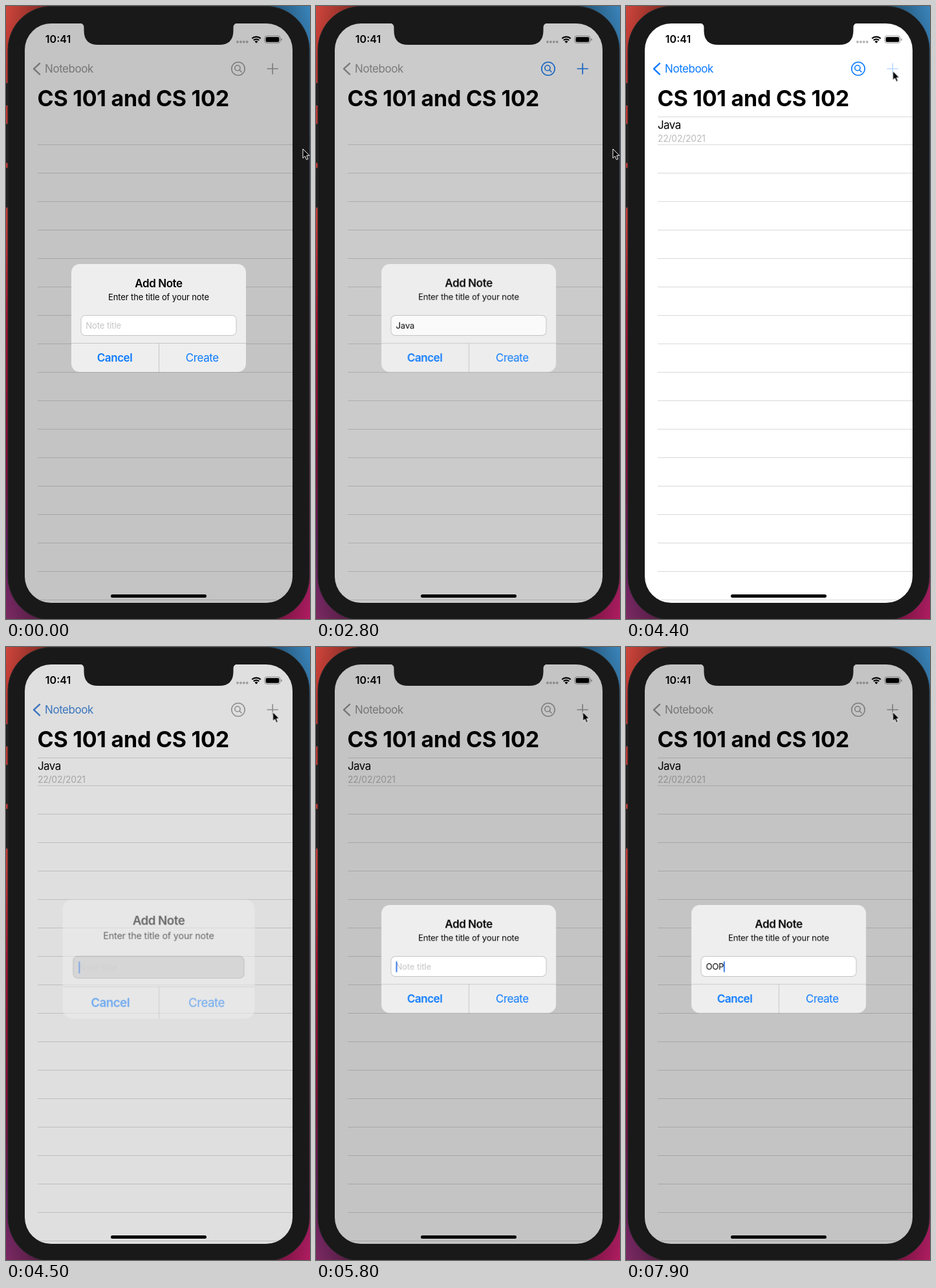
Recreate the animation shown at these times as an HTML page. Size 470x948 px, loop 8 s.

```html
<!DOCTYPE html>
<html lang="en">
<head>
<meta charset="utf-8">
<title>Add Note</title>
<style>
  html, body { margin: 0; width: 100%; height: 100%; overflow: hidden; background: #191919; }
  svg { display: block; width: 470px; height: 948px; }
  text { font-family: Inter, "Liberation Sans", sans-serif; font-size: 17px; letter-spacing: -.43px; white-space: pre; }
  .mid { text-anchor: middle; }
  .semi { font-weight: 600; }
  .small { font-size: 13px; letter-spacing: -.13px; }
  .title { font-size: 34px; font-weight: 700; letter-spacing: -.25px; }
  .time { font-size: 16px; font-weight: 600; letter-spacing: 0; }
  .date { font-size: 14px; letter-spacing: -.25px; fill: #bbb; }
  .link { fill: #0a7aff; }
  .line { fill: none; stroke: currentColor; stroke-linecap: round; stroke-linejoin: round; }

  /* One shared 8 s loop, held in 100 ms steps */
  .dim, .alert, .field, .back, .icons, .plus, .row, .pointer { animation: 8s step-end infinite; }
  .dim { animation-name: dim; }
  .alert { animation-name: alert; transform-origin: 236px 482.5px; }
  .field { animation-name: field; }
  .back { animation-name: back; }
  .icons { animation-name: icons; }
  .plus { animation-name: press; }
  .row { animation-name: row; }
  .pointer { animation-name: point; }

  @keyframes dim {
    0% { opacity: .23; }
    35% { opacity: .205; }
    36.25% { opacity: .07; }
    37.5% { opacity: .015; }
    38.75% { opacity: 0; }
    56.25% { opacity: .125; }
    57.5% { opacity: .21; }
    58.75%, 100% { opacity: .23; }
  }
  @keyframes alert {
    0% { opacity: 1; transform: none; }
    35% { opacity: .97; }
    36.25% { opacity: .3; }
    37.5% { opacity: .06; }
    38.75% { opacity: 0; }
    56.25% { opacity: .54; transform: scale(1.1); }
    57.5% { opacity: .92; transform: scale(1.015); }
    58.75%, 100% { opacity: 1; transform: none; }
  }
  @keyframes field {
    0% { fill: #fff; stroke: #c4c4c6; }
    35% { fill: #fbfbfb; stroke: #c4c4c6; }
    36.25% { fill: #cfcfcf; stroke: #cfcfcf; }
    56.25% { fill: #cfcfcf; stroke: #a8a8a8; }
    57.5% { fill: #f6f6f6; stroke: #c0c0c2; }
    58.75%, 100% { fill: #fff; stroke: #c4c4c6; }
  }
  @keyframes back {
    0% { color: #999; }
    36.25% { color: #1a7df2; }
    37.5% { color: #0a7aff; }
    56.25% { color: #4285d8; }
    57.5% { color: #8794a3; }
    58.75%, 100% { color: #999; }
  }
  @keyframes icons {
    0% { color: #a3a3a3; }
    35% { color: #1a7cf2; }
    37.5% { color: #0a7aff; }
    56.25%, 100% { color: #a3a3a3; }
  }
  @keyframes press {
    0% { opacity: 1; }
    53.75% { opacity: .28; }
    56.25%, 100% { opacity: 1; }
  }
  @keyframes row {
    0% { visibility: hidden; }
    38.75%, 100% { visibility: visible; }
  }
  @keyframes point {
    0% { transform: translate(459px, 221px); }
    43.75% { transform: translate(459px, 221px); animation-timing-function: steps(7); }
    52.5%, 100% { transform: translate(412.5px, 100.5px); }
  }
</style>
</head>
<body>
<svg viewBox="0 0 470 948">
  <defs>
    <linearGradient id="warm" x2="0" y2="1">
      <stop offset="0" stop-color="#cf463c"/>
      <stop offset=".1" stop-color="#b8352f"/>
      <stop offset=".35" stop-color="#c23b37"/>
      <stop offset=".52" stop-color="#a2102c"/>
      <stop offset=".75" stop-color="#7c0c36"/>
      <stop offset=".88" stop-color="#5f1d5c"/>
      <stop offset="1" stop-color="#7c2a63"/>
    </linearGradient>
    <linearGradient id="cool" x2="0" y2="1">
      <stop offset="0" stop-color="#3a85bb"/>
      <stop offset=".1" stop-color="#2d6a99"/>
      <stop offset=".9" stop-color="#8f1c58"/>
      <stop offset="1" stop-color="#b01c60"/>
    </linearGradient>
    <linearGradient id="shade">
      <stop offset="0" stop-opacity="0"/>
      <stop offset=".15" stop-opacity=".45"/>
      <stop offset=".85" stop-opacity=".45"/>
      <stop offset="1" stop-opacity="0"/>
    </linearGradient>
    <clipPath id="screen"><rect x="29" y="27" width="414" height="896" rx="41"/></clipPath>
  </defs>

  <!-- Desktop and phone body -->
  <rect width="235" height="948" fill="url(#warm)"/>
  <rect x="235" width="235" height="948" fill="url(#cool)"/>
  <rect width="470" height="948" fill="url(#shade)"/>
  <g fill="#1e1e1e" stroke="#363636">
    <rect x="-3" y="119.500" width="8" height="34" rx="1"/>
    <rect x="-3" y="182.500" width="8" height="60" rx="1"/>
    <rect x="-3" y="250.500" width="8" height="61" rx="1"/>
  </g>
  <rect x="3" y=".5" width="466" height="949" rx="67" fill="#191919" stroke="#2a2a2a"/>

  <g clip-path="url(#screen)">
    <rect x="29" y="27" width="414" height="896" fill="#fff"/>

    <!-- Status bar -->
    <text class="time mid" x="80.500" y="57.300">10:41</text>
    <path d="M358 55.500h16" stroke="#b4b4b4" stroke-width="3.800" stroke-linecap="round" stroke-dasharray="0 4.900"/>
    <g fill="none" stroke="#000" stroke-width="2.200">
      <path d="M380.300 50.300a9.500 9.500 0 0 1 13.400 0"/>
      <path d="M382.800 53a6 6 0 0 1 8.400 0"/>
    </g>
    <path d="M387 57.500l-2.500-2.600a3.600 3.600 0 0 1 5 0z"/>
    <rect x="399.900" y="46.300" width="24" height="11" rx="3.400" fill="none" stroke="#000" stroke-opacity=".4"/>
    <rect x="401.500" y="47.900" width="20.800" height="7.800" rx="2"/>
    <path d="M425.400 50v3.800q1.500-.5 1.500-1.900t-1.500-1.900z" fill-opacity=".45"/>

    <!-- Navigation -->
    <g class="back">
      <path class="line" stroke-width="2.400" d="M52 88.800L43 97.200L52 105.600"/>
      <text x="60" y="103" fill="currentColor">Notebook</text>
    </g>
    <g class="icons">
      <g class="line" stroke-width="1.600">
        <circle cx="359" cy="97" r="10.200"/>
        <circle cx="357.900" cy="95.900" r="4.100"/>
        <path d="M361 99l3 3"/>
      </g>
      <path class="line plus" stroke-width="1.700" d="M404.200 97h16M412.200 89v16"/>
    </g>
    <text class="title" x="48.500" y="155.300">CS 101 and CS 102</text>

    <!-- List -->
    <path id="rules" stroke="#d9d9db"/>
    <g class="row">
      <path d="M49 171.500H443" stroke="#d9d9db"/>
      <text x="49" y="190" style="letter-spacing:-.6px">Java</text>
      <text class="date" x="49" y="209.500">22/02/2021</text>
    </g>
    <rect x="162" y="910" width="148" height="5" rx="2.500"/>
    <rect class="dim" x="29" y="27" width="414" height="896"/>
  </g>

  <!-- Notch -->
  <path d="M114 26.500Q120.500 27 120.500 33V38Q120.500 60 142.500 60H329.500Q351.500 60 351.500 38V33Q351.500 27 358 26.500z" fill="#191919"/>

  <!-- Alert -->
  <g class="alert">
    <rect x="101" y="399" width="270" height="167" rx="13" fill="#eee"/>
    <text class="semi mid" x="236" y="434.500">Add Note</text>
    <text class="small mid" x="236" y="454.500">Enter the title of your note</text>
    <rect class="field" x="116" y="478.500" width="240" height="31" rx="6.500"/>
    <text class="small" id="hint" x="123.300" y="499.300" fill="#c4c4c6" style="letter-spacing:-.06px">Note title</text>
    <text class="small" id="typed" x="123.500" y="499.300"></text>
    <rect id="caret" x="123.500" y="486" width="2" height="17" rx="1" fill="#3a7be8"/>
    <path d="M101 521.500H371M236.500 521.500V566" stroke="#c6c6c9"/>
    <text class="semi mid link" x="168" y="550">Cancel</text>
    <text class="mid link" x="303.300" y="550">Create</text>
  </g>

  <path class="pointer" d="M0 0V14.300L3.300 11.200L5.500 16.500L8 15.500L5.800 10.300H10z" stroke="#fff" stroke-linejoin="round"/>
</svg>
<script>
  const LOOP = 8000, STEP = 100;
  const $ = id => document.getElementById(id);
  const hint = $('hint'), typed = $('typed'), caret = $('caret');

  let rules = '';
  for (let y = 214.5; y < 923; y += 44) rules += `M49 ${y}H443`;
  $('rules').setAttribute('d', rules);

  // Each session: when the field is live, and when its letters land
  const sessions = [
    { from: -800, blur: 2800, to: 4500, word: 'Java', first: 1000, gap: 300 },
    { from: 4500, blur: LOOP, to: LOOP, word: 'OOP', first: 7000, gap: 300 }
  ];

  function draw(t) {
    const s = sessions.find(s => t < s.to);
    const count = Math.min(s.word.length, Math.max(0, Math.floor((t - s.first) / s.gap) + 1));
    const lastKey = count ? s.first + (count - 1) * s.gap : s.from;
    const blinkOn = (t - lastKey) % 1000 < 500;

    typed.textContent = s.word.slice(0, count);
    hint.style.visibility = count ? 'hidden' : 'visible';
    caret.style.visibility = t < s.blur && blinkOn ? 'visible' : 'hidden';
    caret.setAttribute('x', 123.5 + (count ? typed.getComputedTextLength() - .5 : 0));
  }

  let start;
  function tick(now) {
    start ??= now;
    draw(Math.floor((now - start) % LOOP / STEP) * STEP);
    requestAnimationFrame(tick);
  }
  draw(0);
  requestAnimationFrame(tick);
</script>
</body>
</html>
```
